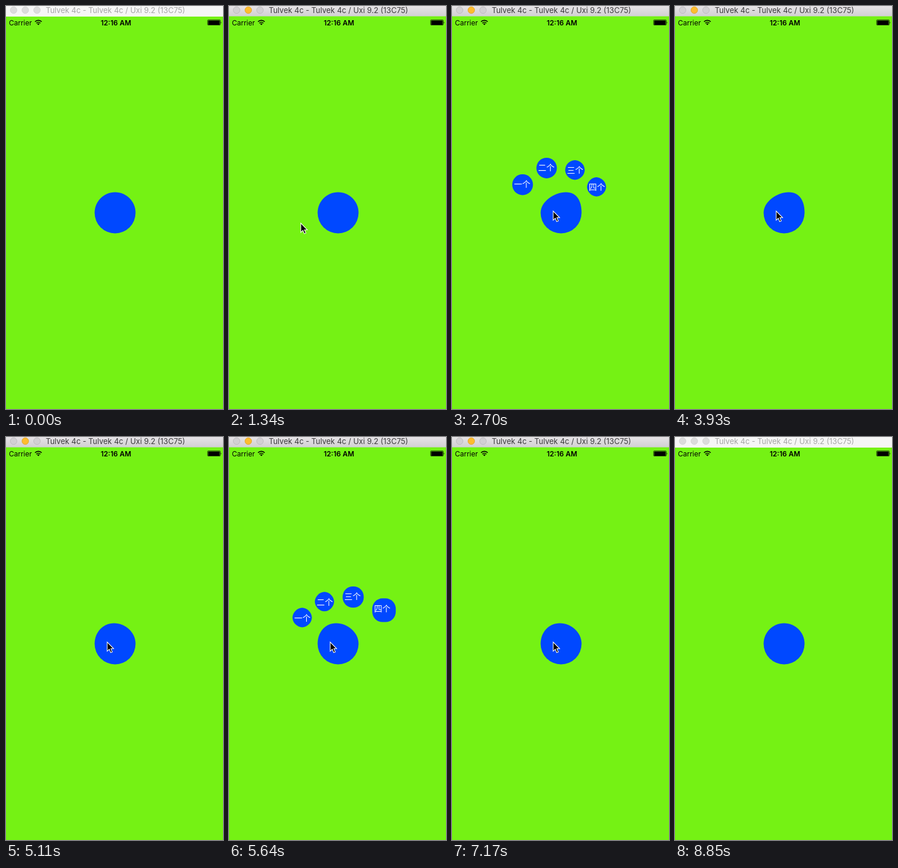
An HTML page that plays this animation: 371x685 px, repeating every 8.95 s.

```html
<!DOCTYPE html>
<html lang="en">
<head>
<meta charset="utf-8">
<title>Elastic menu</title>
<style>
html, body { margin: 0; width: 100%; height: 100%; overflow: hidden; background: #75f214; }
svg { display: block; width: 371px; height: 685px; }
text { font-family: Inter, "Open Sans", sans-serif; }
.item text { font: 300 14px "Noto Sans CJK SC", "Noto Sans CJK", sans-serif; fill: #fff; }
.blue { fill: #0048ff; }
</style>
</head>
<body>
<svg viewBox="0 0 371 685">
  <defs>
    <linearGradient id="bar" x2="0" y2="1">
      <stop stop-color="#e6e3e6"/><stop offset="1" stop-color="#d2d0d3"/>
    </linearGradient>
  </defs>
  <rect width="371" height="685" fill="#75f214"/>

  <g id="idle">
    <rect width="371" height="18" fill="#f6f6f6"/>
    <g fill="#dcdcdc" stroke="#cfcfcf" stroke-width=".8">
      <circle cx="13" cy="7" r="5.7"/><circle cx="33" cy="7" r="5.7"/><circle cx="53" cy="7" r="5.7"/>
    </g>
  </g>
  <g id="focus">
    <rect width="371" height="17.5" fill="url(#bar)"/>
    <g fill="#d2d0d3" stroke="#b9b7ba" stroke-width=".8">
      <circle cx="13" cy="7" r="5.7"/>
      <circle cx="33" cy="7" r="5.7" fill="#fdbd2f" stroke="#dfa023"/>
      <circle cx="53" cy="7" r="5.7"/>
    </g>
  </g>
  <text id="title" x="68" y="12" font-size="13">Tulvek 4c - Tulvek 4c / Uxi 9.2 (13C75)</text>

  <text x="5" y="32.5" font-size="12">Carrier</text>
  <text x="188" y="32.5" font-size="12" font-weight="600" text-anchor="middle">12:16 AM</text>
  <g fill="none" stroke="#000" stroke-width="1.6">
    <path d="M49.6 26.8a8 8 0 0 1 11.4 0M51.8 29.2a5 5 0 0 1 7 0"/>
    <path d="M55.3 32.6l-2-2.1a3 3 0 0 1 4 0z" fill="#000" stroke="none"/>
  </g>
  <rect x="344.5" y="23.5" width="22" height="9" rx="1.5" fill="none" stroke="#000" stroke-opacity=".6"/>
  <rect x="345.5" y="24.5" width="20" height="7.5" rx=".6"/>
  <path d="M367.5 26.5q1.6 1.8 0 3.6z"/>

  <g id="items"></g>
  <path id="blob" class="blue"/>
  <path id="cursor" d="M0 0V15.6L3.6 12.3 6 18 8.7 16.9 6.3 11.3H11Z" fill="#000" stroke="#fff" stroke-width="1.1"/>
</svg>
<script>
const LOOP = 8950, CX = 186.5, CY = 351.5, R = 35;
const DIST = 80, SIZE = 35, CORNER = 17.5;
const OPENS = [1855, 4986];
const OPEN_DELAY = 100, CLOSE_DELAY = 1620, STAGGER = 86;
const WOBBLE_PERIOD = 306, WOBBLE_END = 2955;

// time, x, y of the pointer tip
const POINTER = [
  [1020, 269, 555], [1130, 111, 374], [1310, 111, 374], [1620, 173, 348.5],
  [7380, 173, 348.5], [7690, 346, 641], [8130, 349, 686]
];

const $ = id => document.getElementById(id);
const show = (el, on) => el.setAttribute("visibility", on ? "visible" : "hidden");

const items = ["一个", "二个", "三个", "四个"].map((label, i) => {
  const make = name => document.createElementNS("http://www.w3.org/2000/svg", name);
  const g = make("g"), shape = make("path"), text = make("text");
  g.setAttribute("class", "item");
  shape.setAttribute("class", "blue");
  text.textContent = label;
  g.append(shape, text);
  $("items").append(g);
  return { shape, text, angle: Math.PI * (4 - i) / 5, lag: i * STAGGER };
});

// remaining offset of an underdamped spring released from 1
function spring(ms) {
  if (ms <= 0) return 1;
  const a = ms * 0.0125;
  return Math.exp(-0.436 * a) * (Math.cos(a) + 0.436 * Math.sin(a));
}

function spread(ms, lag) {
  const closing = ms - CLOSE_DELAY - lag;
  if (closing > 160) return 0;
  return closing > 0 ? spring(closing) : 1 - spring(ms - OPEN_DELAY - lag);
}

// square with a fixed corner radius; where the corners overlap, only their common area stays
function tile(x, y, size) {
  const gap = Math.max(0, CORNER - size / 2), s = Math.max(0, size - 2 * CORNER);
  const c = Math.sqrt(CORNER ** 2 - gap ** 2) - gap;
  const arc = (dx, dy) => `a${CORNER} ${CORNER} 0 0 1 ${dx} ${dy}`;
  return `M${x - c - s / 2} ${y - s / 2}${arc(c, -c)}h${s}${arc(c, c)}v${s}${arc(-c, c)}h${-s}${arc(-c, -c)}z`;
}

function drawItem({ shape, text, angle, lag }, ms) {
  const p = spread(ms, lag);
  const size = SIZE * Math.max(0, Math.min(p, 1 + 0.7 * (p - 1)));
  const x = CX + Math.cos(angle) * DIST * p, y = CY - Math.sin(angle) * DIST * p;
  show(shape, p > 0.02);
  show(text, p > 0.3);
  shape.setAttribute("d", tile(x, y, size));
  text.setAttribute("x", x - size / 2 + 3);
  text.setAttribute("y", y - size / 2 + 22.4);
}

function wobble(ms) {
  if (ms <= 0 || ms > WOBBLE_END) return 0;
  const amp = 9 * Math.min(1, ms / 600) * Math.exp(-Math.max(0, ms - 2050) / 300);
  return amp * Math.sin((ms - 178) / WOBBLE_PERIOD * 2 * Math.PI);
}

function drawBlob(ms) {
  const k = R * 0.5523, top = CX + wobble(ms), l = CX - R, r = CX + R, t = CY - R;
  $("blob").setAttribute("d",
    `M${l} ${CY}C${l} ${CY - k} ${top - k} ${t} ${top} ${t}` +
    `S${r} ${CY - k} ${r} ${CY}A${R} ${R} 0 0 1 ${l} ${CY}z`);
}

function drawPointer(t) {
  const last = POINTER.length - 1;
  const on = t >= POINTER[0][0] && t < POINTER[last][0];
  show($("cursor"), on);
  if (!on) return;
  const i = POINTER.findIndex(k => k[0] > t);
  const [t0, x0, y0] = POINTER[i - 1], [t1, x1, y1] = POINTER[i];
  const u = (t - t0) / (t1 - t0), e = i === 5 ? u * u * (3 - 2 * u) : u * (2 - u);
  $("cursor").setAttribute("transform", `translate(${x0 + (x1 - x0) * e} ${y0 + (y1 - y0) * e})`);
}

function draw(t) {
  const active = t >= 690 && t < 8850;
  show($("idle"), !active);
  show($("focus"), active);
  $("title").setAttribute("fill", active ? "#3c3b3d" : "#a6a6a6");
  const ms = t - (t < OPENS[1] ? OPENS[0] : OPENS[1]);
  items.forEach(item => drawItem(item, ms));
  drawBlob(ms);
  drawPointer(t);
}

const start = performance.now();
function tick() {
  draw((performance.now() - start) % LOOP);
  requestAnimationFrame(tick);
}
tick();
</script>
</body>
</html>
```
